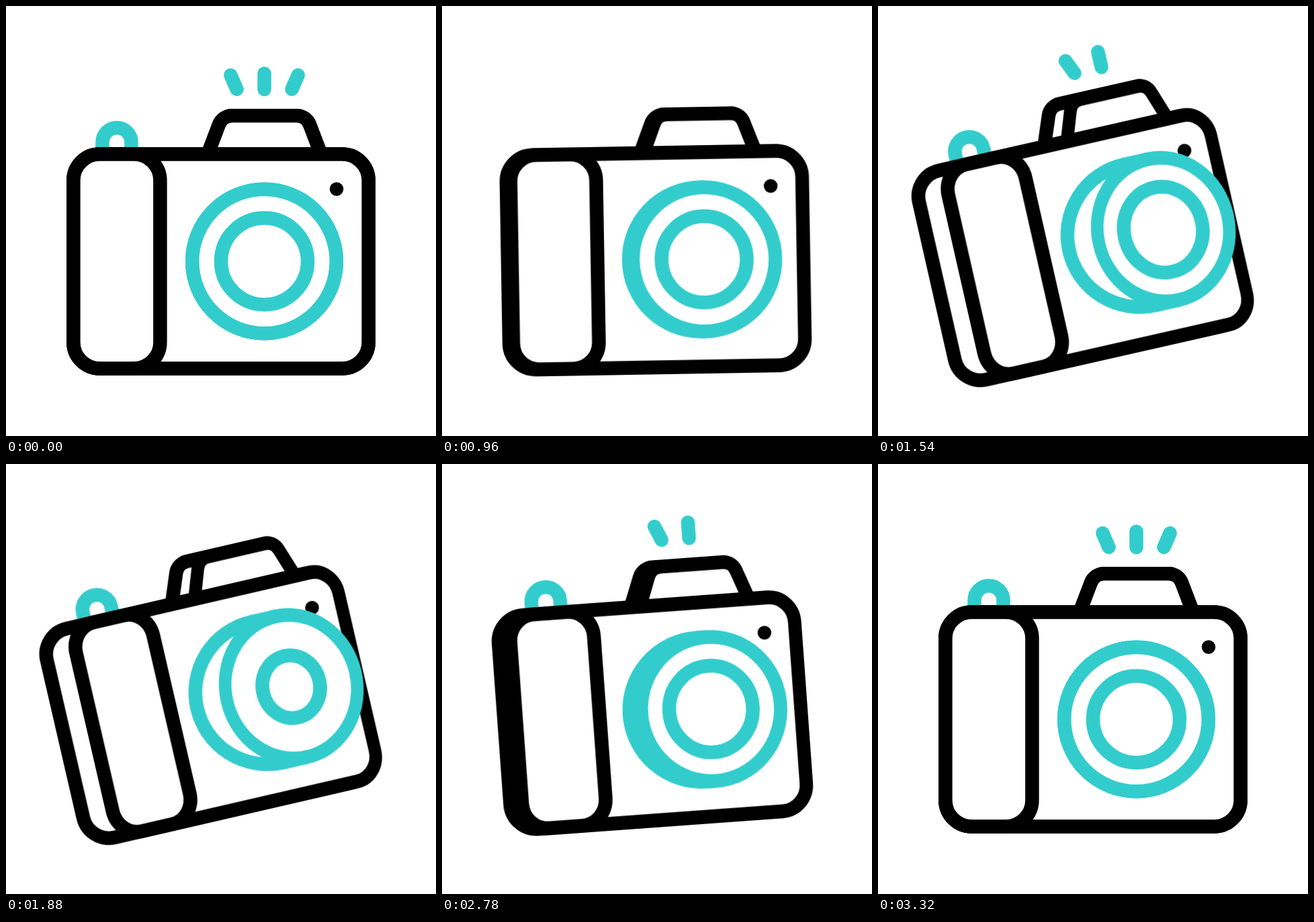
An HTML page without scripts that plays this animation: 640x640 px, repeating every 3.6 s.

```html
<!DOCTYPE html>
<html lang="en">
<head>
<meta charset="utf-8">
<title>Camera</title>
<style>
  /* 0 = seen from the front, 1 = fully turned */
  @property --turn { syntax: "<number>"; inherits: true; initial-value: 0; }

  html, body { margin: 0; width: 100%; height: 100%; overflow: hidden; background: #fff; }
  svg { display: block; width: 100vw; height: 100vh; }

  .camera, .loop, .pupil, .flash path {
    animation: 3600ms cubic-bezier(.33, 0, .67, 1) infinite;
  }
  .camera {
    fill: #fff; stroke: #000; stroke-width: 20.5;
    transform-origin: 320px 380px;
    animation-name: tilt, drift, turn;
  }
  .teal { stroke: #3cc; }
  .line { fill: none; stroke-linecap: round; }

  .lift { transform: translateX(calc(var(--turn) * 25px)); }
  .front {
    transform-origin: 320px 380px;
    transform: translateX(calc(var(--turn) * var(--depth))) scaleX(calc(1 - var(--turn) * .0875));
  }
  .front * { vector-effect: non-scaling-stroke; }
  .barrel {
    vector-effect: non-scaling-stroke;
    transform-origin: 384.5px 380px;
    transform: scaleX(var(--turn));
  }
  .loop { animation-name: loop; }
  .pupil { animation-name: pupil; }
  .flash path { stroke-dasharray: 1 3; }
  .left { animation-name: left !important; }
  .middle { animation-name: middle !important; }
  .right { animation-name: right !important; }

  @keyframes tilt {
    0%, 23.14% { rotate: 0deg; }
    44.44% { rotate: -13deg; }
    69.44% { rotate: -13deg; animation-timing-function: cubic-bezier(.33, .92, .67, 1); }
    92.22%, 100% { rotate: 0deg; }
  }
  @keyframes drift {
    0% { translate: 0 0; }
    23.14% { translate: 0 0; animation-timing-function: ease-in; }
    30% { translate: -7px -5px; animation-timing-function: linear; }
    35% { translate: -16.7px -7.7px; animation-timing-function: linear; }
    38.89% { translate: -18.2px -14px; animation-timing-function: ease-out; }
    44.44% { translate: -18.1px -20.2px; }
    69.44% { translate: -18.1px -20.2px; animation-timing-function: cubic-bezier(.33, .64, .67, 1); }
    92.22%, 100% { translate: 0 0; }
  }
  @keyframes turn {
    0%, 23.14% { --turn: 0; }
    38.89% { --turn: 1; }
    69.44% { --turn: 1; animation-timing-function: cubic-bezier(.33, .75, .67, 1); }
    92.22%, 100% { --turn: 0; }
  }
  @keyframes loop {
    0%, 13.89%, 39.8%, 55.56%, 76.9%, 100% { transform: translateY(0); }
    27.78%, 32.4%, 67.6%, 69.44% { transform: translateY(41px); }
  }
  @keyframes pupil {
    0%, 27.78%, 41.67%, 69.44%, 100% { r: 64.5px; }
    13.89%, 55.56% { r: 43.9px; }
  }
  /* Each ray leaves at its outer end and grows back from its inner end. */
  @keyframes left {
    0%, 9.25%, 38%, 47.2%, 72.2%, 100% { stroke-dashoffset: 0; }
    13.89%, 51.9% { stroke-dashoffset: -1.1; animation-timing-function: step-end; }
    33.3%, 67.5% { stroke-dashoffset: 1.02; }
  }
  @keyframes middle {
    0%, 9.25%, 42.6%, 47.2%, 75.8%, 100% { stroke-dashoffset: 0; }
    13.89%, 51.9% { stroke-dashoffset: -1.1; animation-timing-function: step-end; }
    38%, 71.1% { stroke-dashoffset: 1.02; }
  }
  @keyframes right {
    0%, 9.25%, 47.2%, 82%, 100% { stroke-dashoffset: 0; }
    13.89%, 51.9% { stroke-dashoffset: -1.1; animation-timing-function: step-end; }
    42.6%, 77.5% { stroke-dashoffset: 1.02; }
  }
</style>
</head>
<body>
<svg viewBox="0 0 640 640">
  <defs>
    <path id="hump" d="M300.5 220 L316.9 176.8 A21 21 0 0 1 336.4 163.3 H432.6 A21 21 0 0 1 452.1 176.8 L468.5 220"/>
    <rect id="body" x="100.4" y="220.5" width="439.2" height="319" rx="39"/>
    <circle id="ring" cx="384.5" cy="380" r="107.3"/>
  </defs>
  <g class="camera">
    <g class="lift teal line">
      <path class="loop" d="M143.5 225 V202.8 a21.5 21.5 0 0 1 43 0 V225"/>
      <g class="flash">
        <path class="left" pathLength="1" d="M343.5 123.8 L334.4 103"/>
        <path class="middle" pathLength="1" d="M384.5 124 V100.5"/>
        <path class="right" pathLength="1" d="M425.5 123.8 L434.6 103"/>
      </g>
    </g>

    <use href="#hump"/>
    <g class="front" style="--depth: 33px"><use href="#hump"/></g>

    <use href="#body"/>
    <g class="front" style="--depth: 25.6px">
      <use href="#body"/>
      <rect x="100.4" y="220.5" width="129" height="319" rx="39"/>
      <path class="line" d="M492 272.5 h.01"/>
    </g>

    <g class="lift teal">
      <use href="#ring"/>
      <path class="barrel" d="M384.5 272.7 h36.3 M384.5 487.3 h36.3"/>
    </g>
    <g class="front teal" style="--depth: 67px">
      <use href="#ring"/>
      <circle class="pupil" cx="384.5" cy="380" r="64.5"/>
    </g>
  </g>
</svg>
</body>
</html>
```
